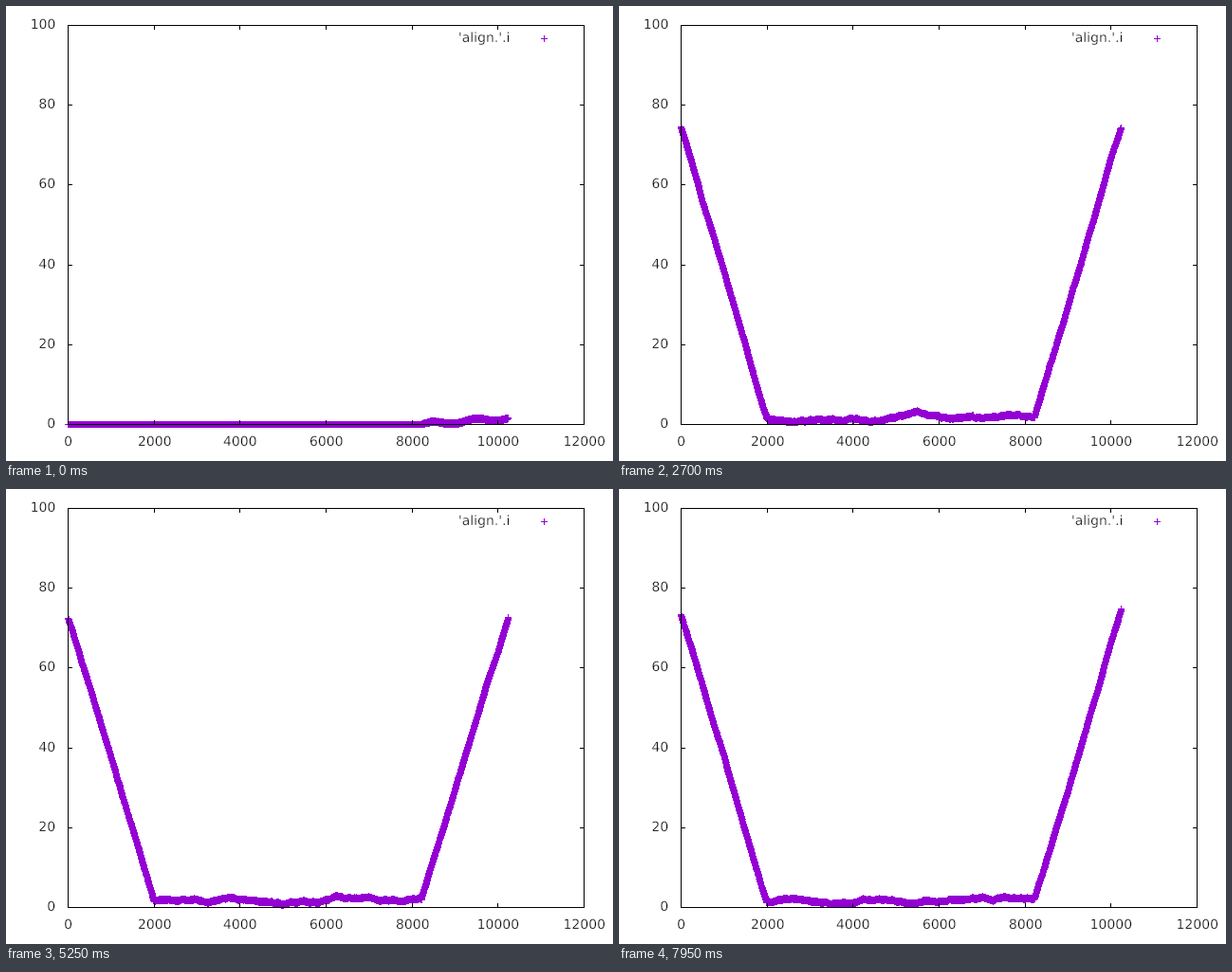
Animation of 640x480 px, one loop 8000 ms. Source, as a matplotlib script:

```python
import numpy as np
import matplotlib.pyplot as plt
from matplotlib.animation import FuncAnimation
from matplotlib.colors import ListedColormap
from matplotlib.patheffects import PathPatchEffect

W, H, DPI = 640, 480, 100
LEFT, RIGHT, TOP, BOTTOM = 65, 609, 20, 441
PX = 72 / DPI                      # one pixel in points
TICK_MS, LOOP_MS, STEP_MS = 50, 8000, 150
PURPLE = "#9400d3"

X = np.arange(10241)
FLAT_START, FLAT_END = 2000, 8220
THIN = [PathPatchEffect(facecolor="black", edgecolor="white", linewidth=0.35 * PX)]


def wobble(rng, spacing, size):
    """Random heights every `spacing` samples, joined by straight lines."""
    knots = np.arange(0, X[-1] + spacing, spacing)
    return np.interp(X, knots, rng.normal(0, size, len(knots)))


def first_curve(rng):
    """Flat at zero, then a slowly rising wave at the end."""
    t = np.clip((X - FLAT_END) / (X[-1] - FLAT_END), 0, 1)
    wave = 1.6 * t + 0.45 * np.sin(4 * np.pi * t)
    return wave + (t > 0) * rng.uniform(-0.25, 0.25, len(X))


def valley_curve(rng):
    """Two steep sides around a low, uneven floor."""
    left, right = rng.normal(73.5, 0.8, 2)
    y = np.interp(X, [0, FLAT_START, FLAT_END, X[-1]], [left, 1.6, 1.8, right])
    y += wobble(rng, 900, 0.6) + wobble(rng, 250, 0.3) + wobble(rng, 60, 0.12)
    return y + rng.uniform(-0.2, 0.2, len(X))


def curve(run):
    rng = np.random.default_rng(1000 + run)
    return np.abs(valley_curve(rng) if run else first_curve(rng))


def to_col(x):
    return np.rint(LEFT + x * (RIGHT - LEFT) / 12000).astype(int)


def to_row(y):
    return np.rint(BOTTOM - y * (BOTTOM - TOP) / 100).astype(int)


def stamp_plus(canvas, cols, rows):
    for d in range(-3, 4):
        canvas[rows, cols + d] = 1
        canvas[rows + d, cols] = 1


def render(run):
    canvas = np.zeros((H, W))
    stamp_plus(canvas, to_col(X), to_row(curve(run)))
    stamp_plus(canvas, 567, 34)
    return canvas


plt.rcParams["font.family"] = "DejaVu Sans"
fig = plt.figure(figsize=(W / DPI, H / DPI), dpi=DPI, facecolor="white")
ax = fig.add_axes([0, 0, 1, 1])
image = ax.imshow(render(0), cmap=ListedColormap(["white", PURPLE]), vmin=0, vmax=1,
                  interpolation="nearest", extent=(0, W, H, 0), aspect="auto")
ax.set(xlim=(0, W), ylim=(H, 0))
ax.axis("off")


def box(x0, y0, x1, y1):
    """Fill the pixels from (x0, y0) to (x1, y1) inclusive."""
    ax.add_patch(plt.Rectangle((x0, y0), x1 - x0 + 1, y1 - y0 + 1, color="black",
                               lw=0, antialiased=False, zorder=3))


def label(x, baseline, text, align):
    ax.text(x, baseline, text, ha=align, va="baseline", size=14 * PX,
            path_effects=THIN)


for row in (TOP, BOTTOM):
    box(LEFT, row, RIGHT, row)
for col in (LEFT, RIGHT):
    box(col, TOP, col, BOTTOM)
for value in np.arange(0, 12001, 2000):
    col = int(to_col(value))
    box(col, TOP, col, TOP + 4)
    box(col, BOTTOM - 4, col, BOTTOM)
    label(col + 0.5, 464, str(value), "center")
for value in np.arange(0, 101, 20):
    row = int(to_row(value))
    box(LEFT, row, LEFT + 4, row)
    box(RIGHT - 4, row, RIGHT, row)
    label(52, row + 4, str(value), "right")
label(532, 38, "'align.'.i", "right")


def update(frame):
    image.set_data(render(frame * TICK_MS // STEP_MS))
    return [image]


anim = FuncAnimation(fig, update, frames=LOOP_MS // TICK_MS, interval=TICK_MS,
                     repeat=True, repeat_delay=0, blit=False)
plt.show()
```
